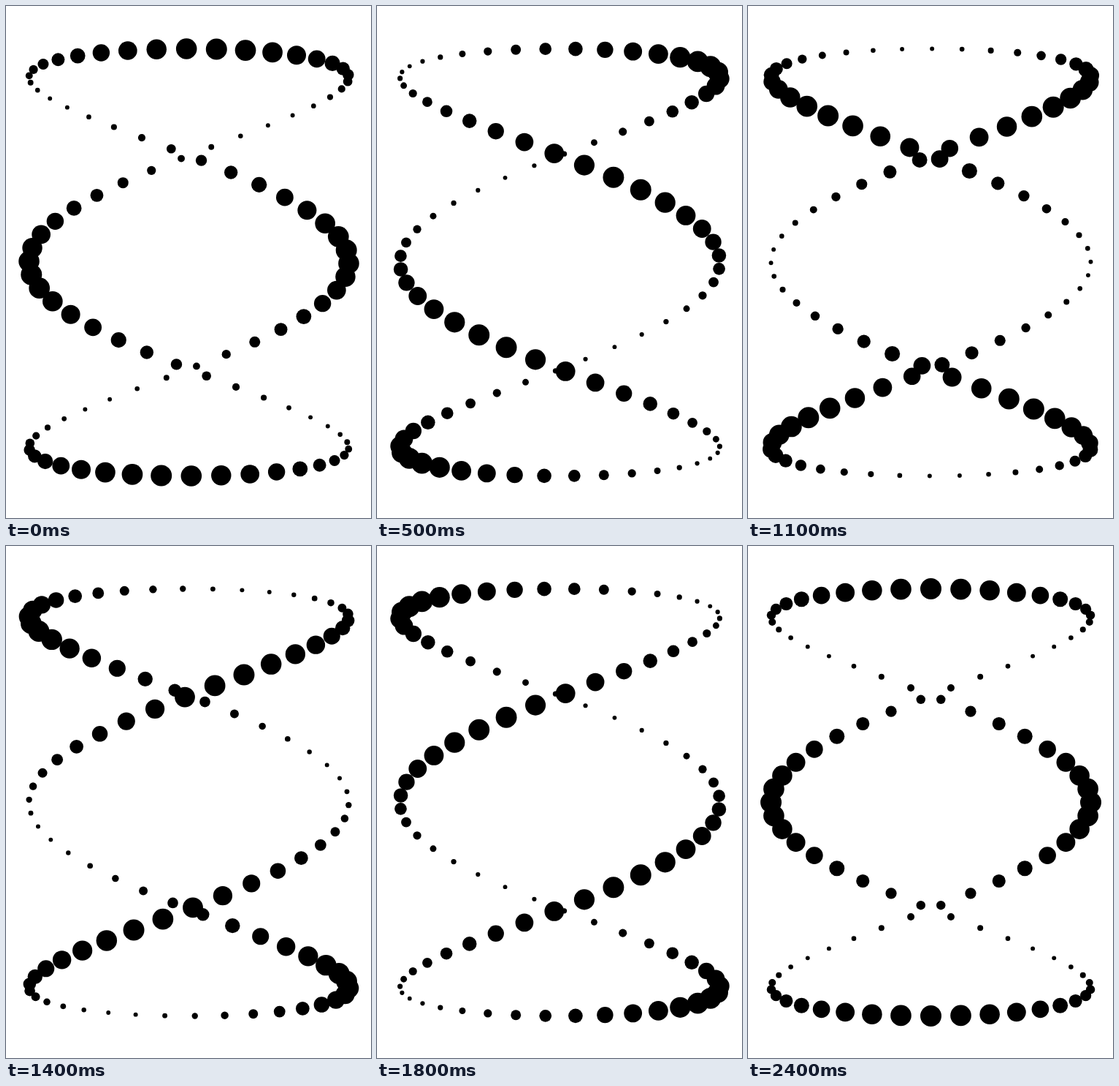
These frames come from a looping animation (500 px wide and 700 px high, 2500 ms). An HTML page with a canvas:

```html
<!DOCTYPE html>
<html lang="en">
<head>
<meta charset="utf-8">
<title>Dots on a Lissajous curve</title>
<style>
  html, body { margin: 0; width: 100%; height: 100%; overflow: hidden; background: #fff; }
  canvas { display: block; }
</style>
</head>
<body>
<canvas id="stage" width="500" height="700"></canvas>
<script>
const ctx = document.getElementById('stage').getContext('2d');
const DOTS = 100, STEPS = 25, STEP_MS = 100, DRIFT = 0.08;
const turn = 2 * Math.PI / DOTS;

function draw(step) {
  ctx.clearRect(0, 0, 500, 700);
  for (let i = 0; i < DOTS; i++) {
    const pos = i - DRIFT * step;
    const t = turn * pos;
    // the size wave runs forward while the dots drift slowly back
    const r = 8.7 + 5.8 * Math.cos(4 * turn * (pos - step));
    ctx.beginPath();
    ctx.arc(250.5 + 219 * Math.sin(3 * t), 350.5 - 292 * Math.cos(t), r, 0, 2 * Math.PI);
    ctx.fill();
  }
}

const start = performance.now();
function tick() {
  const elapsed = performance.now() - start;
  draw(Math.floor(elapsed / STEP_MS) % STEPS + 1);
  requestAnimationFrame(tick);
}
tick();
</script>
</body>
</html>
```
